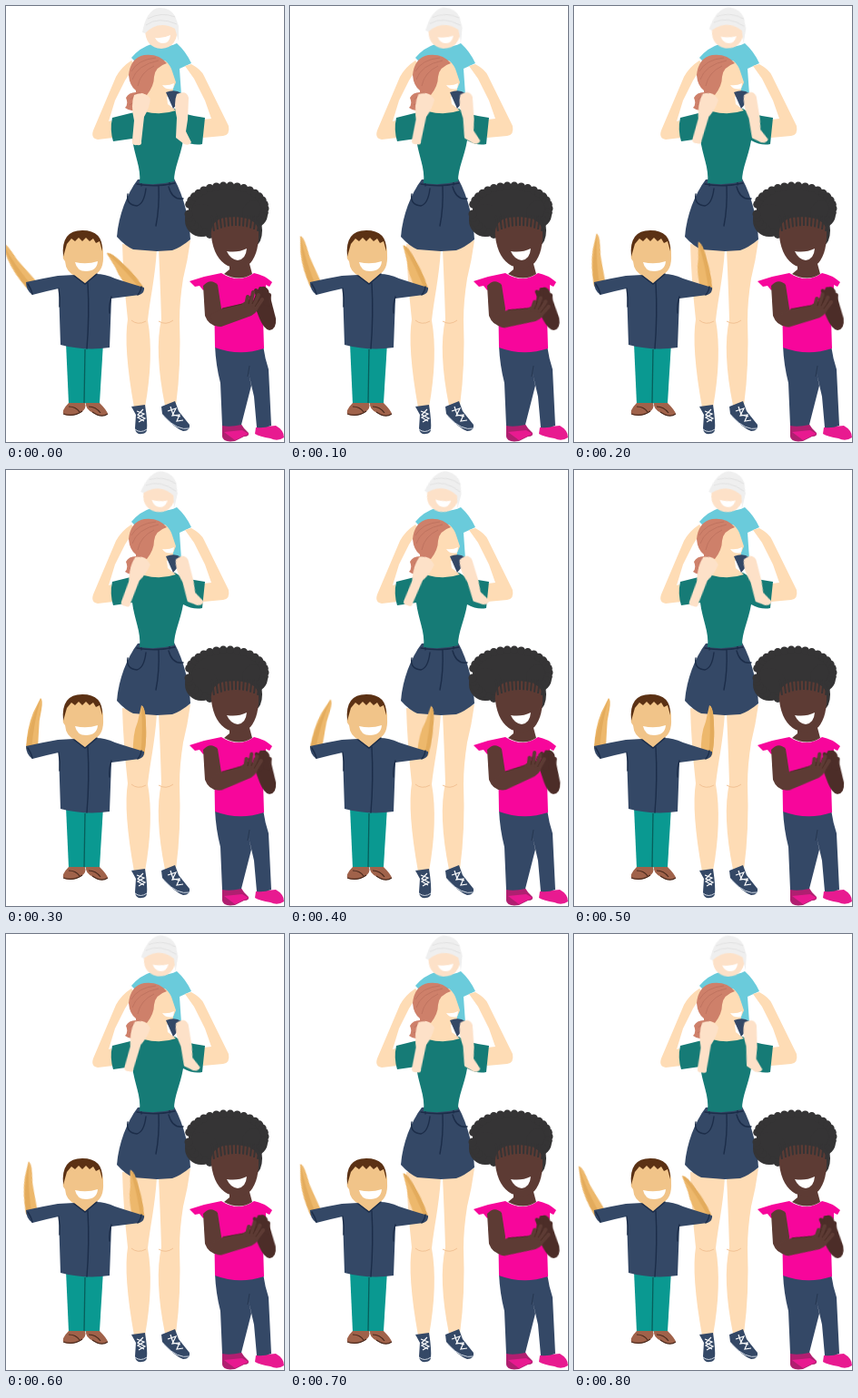
Write an HTML page that moves like this. It is 306 px wide and 480 px high and loops after 0.9 s.

```html
<!DOCTYPE html>
<html lang="en">
<head>
<meta charset="utf-8">
<title>Clapping family</title>
<style>
html, body { margin: 0; width: 100%; height: 100%; overflow: hidden; background: #fff; }
svg { display: block; width: 100vw; height: 100vh; }
.skin { fill: #fedcb5; }
.pale { fill: #fde1c8; }
.navy { fill: #344866; }
.ink { fill: none; stroke: #1c2d49; stroke-width: 1.4; stroke-linecap: round; }
.brown { fill: #5d3b34; }
.lace { fill: none; stroke: #fff; stroke-width: 1.2; }
.crease { fill: none; stroke: #f2c294; stroke-width: 1; }
.fingers { fill: none; stroke-width: 4; stroke-linecap: round; }
</style>
</head>
<body>
<svg viewBox="0 0 306 480" xmlns="http://www.w3.org/2000/svg">
  <!-- child on the shoulders -->
  <path fill="#6acbdb" d="M138 57Q147 46 160 42Q174 48 188 41Q198 50 204 63L191 69L193 98H158L148 58L143 62Z"/>
  <g id="kidHead">
    <path class="pale" d="M153 25Q153 46 171 47Q190 46 189 20L172 13Z"/>
    <path fill="#fff" d="M164 35Q173 36 181 32Q180 41 173 41Q167 41 164 35Z"/>
    <path fill="#efefef" d="M150 29Q152 18 156 11Q162 2 169 2Q181 2 186 11L190 22V39L186 25Q168 15 153 30Z"/>
    <path fill="none" stroke="#dedede" stroke-width=".8" d="M156 14Q171 6 186 12M154 21Q168 11 188 20"/>
  </g>

  <!-- woman -->
  <path class="skin" d="M138 60Q127 67 121 78L96 137Q93 146 101 147L118 145L116 126L113 127L120 104L131 82L142 65Z"/>
  <path class="skin" d="M197 66L204 64Q215 70 218 77L245 132Q247 142 239 143L217 145V125L226 124L219 104L207 80Z"/>
  <path class="skin" d="M128 262L166 268C164 300 158 325 156 346Q163 385 153 442H141Q129 375 134 345Q129 300 128 262Z"/>
  <path class="skin" d="M168 268L203 258Q200 280 195 300Q191 325 191 346Q193 395 187 440H175Q163 380 171 345Q170 310 168 268Z"/>
  <path class="crease" d="M138 346q7 6 16 1M168 347q8 5 16-1"/>
  <path class="navy" d="M145 191L185 190C196 210 202 236 203 257Q192 266 183 269L166 270L140 268Q131 264 122 254C124 230 133 207 145 191Z"/>
  <path class="ink" d="M144 196Q165 200 186 195M168 198Q169 222 165 242M134 207Q132 219 144 220Q152 218 154 201M179 199Q183 214 195 212M149 192v6M180 191v6"/>
  <path fill="#167b76" d="M154 115L137 118L117 123Q114 136 118 149L139 146C141 164 149 178 147 195Q166 198 185 193C185 178 192 166 195 148Q206 154 216 152L219 123Q205 121 194 118L186 113Z"/>
  <path class="skin" d="M150 98L152 116Q170 121 187 115L178 108L177 100Q184 99 184 91L187 84L183 72Q181 65 175 60L155 66Z"/>
  <path fill="#ce806a" d="M143 93Q136 88 135 76Q137 57 152 54Q168 52 177 63Q164 67 163 78Q163 88 155 98L149 96Q152 108 145 113Q139 118 131 112Q135 108 132 101Q135 95 143 95Z"/>
  <path fill="none" stroke="#bb705d" stroke-width=".8" d="M139 81Q144 65 168 60M138 72Q145 59 165 57M145 88Q148 73 163 66M137 103q6-8 11-8M136 109q5-4 11-5"/>
  <path fill="#fff" d="M172 87Q179 88 185 85L184 91Q176 93 172 87Z"/>
  <path class="navy" d="M176 95Q186 91 193 96L194 101L184 113Z"/>
  <path id="kidLegL" class="pale" d="M141 98Q152 93 159 102Q158 112 152 122L149 149Q150 154 144 153Q138 154 139 148L141 126Q137 109 141 98Z"/>
  <path id="kidLegR" class="pale" d="M188 97Q199 92 201 101L200 125L198 138L204 150Q202 154 196 152L187 145L188 123Q184 107 188 97Z"/>
  <g id="shoes">
    <path class="navy" d="M138 441L153 439Q156 458 155 467Q154 471 149 471Q143 472 142 465L143 450Z"/>
    <path fill="none" stroke="#cfd7e2" d="M142 466Q148 471 155 466"/>
    <path class="lace" d="M144 446l8 3-7 4 7 4M151 444l-6 6 8 4-7 4"/>
    <path class="navy" d="M171 441L186 435L190 446L202 461Q203 468 195 468Q186 465 172 449Z"/>
    <path fill="none" stroke="#cfd7e2" d="M174 452Q189 468 202 465"/>
    <path class="lace" d="M178 446l9-3-4 8 8-1-3 7 7-1M181 441l3 9 8 2"/>
  </g>

  <!-- boy -->
  <path fill="#0a9991" d="M66 371H107L103 437L69 438Z"/>
  <path fill="none" stroke="#075f5c" stroke-width="1.3" d="M87 378L86 438"/>
  <g id="sandals">
    <path fill="#a0624a" d="M69 437H87Q89 443 83 447Q73 453 64 450Q60 446 69 437ZM88 437H103Q111 445 112 449Q106 454 96 448Q87 444 88 437Z"/>
    <path fill="none" stroke="#4a2a1e" stroke-width="1.2" d="M63 449Q74 453 84 446M95 447Q105 454 112 449M69 441q8 0 12 6M91 441q8 0 13 7"/>
  </g>
  <g id="boyArmL">
    <path fill="#edb86c" d="M22 307Q23 284 30 267L38 251Q41 253 39 264Q36 276 36 288L35 307Z"/>
    <path fill="#e3ab5c" d="M22 307Q24 283 38 252Q31 276 28 307Z"/>
  </g>
  <g id="boyArmR">
    <path fill="#edb86c" d="M140 313Q139 291 145 277L149 259Q153 260 153 273Q156 292 152 314Z"/>
    <path fill="#e3ab5c" d="M148 314Q151 289 149 260Q154 262 154 280Q155 298 152 314Z"/>
  </g>
  <path class="navy" d="M75 296L57 297L41 300L22 304Q22 313 29 318Q44 314 58 311L60 373Q87 380 114 376L116 322L147 318Q153 315 152 310Q132 304 120 300Q109 295 99 295Z"/>
  <path class="ink" d="M90 305Q92 340 89 377M58 311Q60 321 59 331M116 320Q113 330 114 338M24 306q4 6 5 11M149 309q-1 6-4 9"/>
  <path fill="#f1c489" d="M64 271Q64 250 86 251Q108 252 107 274Q108 290 98 296L87 306L76 297Q66 293 65 281Q61 277 64 271Z"/>
  <path class="ink" d="M75 297L87 306L100 295"/>
  <path fill="#5b3114" d="M63 276Q60 247 84 247Q107 247 106 270L103 259L99 261L96 256L92 259L88 255L84 259L80 255L76 259L72 256L67 262Z"/>
  <path fill="#fff" d="M76 282Q89 285 101 281Q100 292 88 292Q78 292 76 282Z"/>

  <!-- girl -->
  <g id="hair" fill="#353435"></g>
  <path fill="#b01f70" d="M238 461L258 459Q262 466 267 470Q268 474 262 474L252 479Q239 481 238 474Z"/>
  <path fill="#e81a90" d="M240 469L252 478L267 471L260 467ZM275 464L297 462Q306 467 306 475Q299 480 291 476Q279 474 274 471Z"/>
  <path class="navy" d="M230 374H283Q285 388 289 400L292 462Q284 465 276 464L273 430L267 404L270 418L259 461Q246 464 238 462L236 415Q231 396 230 374Z"/>
  <path fill="none" stroke="#263750" d="M266 408l2-12"/>
  <path fill="#f7069b" d="M202 303Q219 297 237 294Q256 306 273 294Q284 296 293 304L290 309L286 307L286 314L282 311L284 377Q257 386 230 376L229 314L222 309L217 313L213 308L208 309Z"/>
  <path class="brown" d="M246 280H267L271 295Q257 304 240 295L246 290Z"/>
  <path class="brown" d="M226 254Q224 237 240 233Q274 229 278 247Q279 271 269 283Q258 292 244 286Q229 278 226 254Z"/>
  <path id="hairline" fill="none" stroke="#353435" stroke-width="2"/>
  <path fill="#fff" d="M243 270Q255 272 265 267Q264 279 255 280Q247 279 243 270Z"/>
  <g id="girlArmR" fill="#4c2d28">
    <path d="M277 312Q284 305 289 313L297 344Q298 356 290 357Q284 356 279 344L272 326Z"/>
    <path class="fingers" stroke="#4c2d28" d="M280 330L275 313M282 328L280 311M286 328L286 313M289 329L290 318"/>
  </g>
  <path class="brown" d="M217 308Q225 299 233 307L237 333L236 352Q224 354 219 341Z"/>
  <g id="girlArmL" class="brown">
    <path d="M225 340L238 333L259 328L267 323L279 327Q279 336 270 341L237 353Q227 354 225 340Z"/>
    <path class="fingers" stroke="#5d3b34" d="M264 330L266 320M269 329L272 315M273 330L278 318M275 333L282 323"/>
    <path fill="none" stroke="#44271f" stroke-width=".8" d="M238 333L260 328M269 319l-2 9M275 319l-4 9M279 323l-5 8"/>
  </g>
</svg>
<script>
const STEP = 100;
const byId = id => document.getElementById(id);

// Scalloped afro: small curls around an ellipse plus side puffs.
const hair = byId('hair');
const curl = (cx, cy, rx, ry = rx) => {
  const e = document.createElementNS('http://www.w3.org/2000/svg', 'ellipse');
  for (const [k, v] of Object.entries({ cx, cy, rx, ry })) e.setAttribute(k, v);
  hair.append(e);
};
curl(243, 224, 42, 27);
curl(215, 236, 18, 18);
curl(274, 229, 14, 15);
curl(275, 247, 7, 16);
for (let i = 0; i < 34; i++) {
  const a = i / 34 * Math.PI * 2;
  const drop = Math.cos(a) < 0 && Math.sin(a) > 0 ? 6 : 0;
  curl(243 + 42 * Math.cos(a), 223 + 25 * Math.sin(a) + drop, 4.5);
}

// Strands over the forehead fan out from the middle.
let strands = '';
for (let x = -24; x <= 24; x += 4) {
  strands += `M${253 + x} ${242 + x * x / 100}L${253 + x * 1.1} 230`;
}
byId('hairline').setAttribute('d', strands);

// swing runs from 0 (arms wide) past 1 (forearms raised)
const swing = [0, .39, .7, 1, 1.15, 1, .7, .39, .24];
const clapL = [0, 8, 3, -3, -5, -3, 3, 8, 8];
const clapR = [0, -5, -2, 1, 3, 1, -2, -5, -5];

function turn(id, x, y, angles) {
  const part = byId(id);
  part.style.transformOrigin = `${x}px ${y}px`;
  const frames = [...angles, angles[0]].map((a, i) => ({
    transform: `rotate(${a}deg)`, offset: i / angles.length, easing: 'step-end'
  }));
  part.animate(frames, { duration: STEP * angles.length, iterations: Infinity });
}
const along = (from, to) => swing.map(p => from + (to - from) * p);

turn('boyArmL', 29, 307, along(-45, 0));
turn('boyArmR', 146, 313, along(-44, 0));
turn('kidLegL', 150, 102, along(0, 15));
turn('kidLegR', 193, 102, along(0, -17));
turn('kidHead', 172, 19, along(0, 13));
turn('girlArmL', 227, 346, clapL);
turn('girlArmR', 291, 352, clapR);
</script>
</body>
</html>
```
